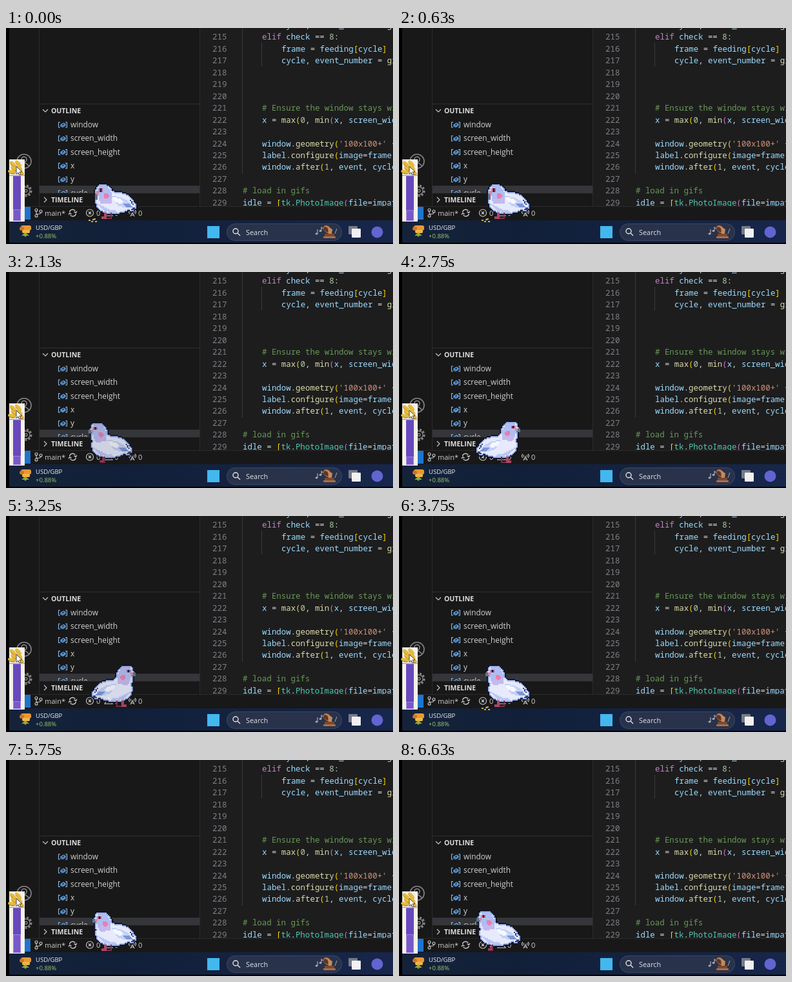
Write an HTML page with a canvas that moves like this. It is 600x337 px and loops after 6.76 s.

```html
<!DOCTYPE html>
<html>
<head>
<meta charset="utf-8">
<style>
html, body { margin: 0; height: 100%; overflow: hidden; background: #000; }
canvas { display: block; width: 100vw; height: 100vh; }
</style>
</head>
<body>
<canvas id="stage" width="600" height="337"></canvas>
<script>
const g = document.getElementById('stage').getContext('2d');
const LOOP = 6760, STEP = 125, LAST = 53, CELL = 2;
const SANS = '"Open Sans", "Noto Sans", sans-serif';
const MONO = '12.42px "Noto Sans Mono", monospace';

function rect(color, x, y, w, h, r = 0) {
  g.fillStyle = color;
  g.beginPath();
  g.roundRect(x, y, w, h, r);
  g.fill();
}
function ellipse(color, x, y, rx, ry = rx, turn = 0) {
  g.fillStyle = color;
  g.beginPath();
  g.ellipse(x, y, rx, ry, turn, 0, 7);
  g.fill();
}
function stroke(color, path, width = 1.1) {
  g.strokeStyle = color;
  g.lineWidth = width;
  g.stroke(new Path2D(path));
}
function shape(color, path) {
  g.fillStyle = color;
  g.fill(new Path2D(path));
}
function text(s, x, y, size, color = '#d0d0d0', weight = 400) {
  g.font = `${weight} ${size}px ${SANS}`;
  g.fillStyle = color;
  g.fillText(s, x, y);
}

// Code: each token starts with the key of its colour.
const SYNTAX = { p: '#c586c0', b: '#9cdcfe', w: '#d4d4d4', n: '#b5cea8', f: '#dcdcaa',
  c: '#6a9955', s: '#ce9178', t: '#4ec9b0', y: '#ffd700', m: '#da70d6' };
const CODE = {
  214: [427, 'bcycle|w, |bevent_number|w = |fgif'],
  215: [397, 'pelif |bcheck |w== |n8|w:'],
  216: [427, 'bframe |w= |bfeeding|y[|bcycle|y]'],
  217: [427, 'bcycle|w, |bevent_number |w= |fgif'],
  221: [397, 'c# Ensure the window stays wi'],
  222: [397, 'bx |w= |fmax|y(|n0|w, |fmin|m(|bx|w, |bscreen_wid'],
  224: [397, "bwindow|w.|fgeometry|y(|s'100x100+' |w+"],
  225: [397, 'blabel|w.|fconfigure|y(|bimage|w=|bframe|y)'],
  226: [397, 'bwindow|w.|fafter|y(|n1|w, |bevent|w, |bcycle'],
  228: [367, 'c# load in gifs'],
  229: [367, 'bidle |w= |y[|ttk|w.|tPhotoImage|m(|bfile|w=|bimpath']
};

function editor() {
  rect('#1d1d1e', 300, 0, 300, 278);
  rect('#3a3a3a', 366, 0, 1, 227);
  rect('#3a3a3a', 396, 23, 1, 37);
  g.font = MONO;
  for (let n = 214; n < 230; n++) {
    const y = 18.2 + (n - 215) * 18.48;
    g.fillStyle = '#7d8085';
    g.fillText(n, 320, y);
    if (!CODE[n]) continue;
    let [x, line] = CODE[n];
    for (const token of line.split('|')) {
      const s = token.slice(1);
      g.fillStyle = SYNTAX[token[0]];
      g.fillText(s, x, y);
      x += g.measureText(s).width;
    }
  }
}

function sidebar() {
  rect('#181818', 5, 0, 295, 278);
  rect('#2b2b2b', 51, 0, 1, 278);
  rect('#2b2b2b', 300, 0, 1, 278);
  rect('#2f2f30', 52, 118, 248, 1);
  rect('#35363a', 52, 246, 248, 11);
  stroke('#ccc', 'M57 127l4 4 4-4');
  text('OUTLINE', 70, 133, 10.5, '#ddd', 700);
  g.save();
  g.beginPath();
  g.rect(52, 119, 248, 138);
  g.clip();
  ['window', 'screen_width', 'screen_height', 'x', 'y', 'cycle'].forEach((name, i) => {
    const y = 151 + i * 21.3;
    stroke('#93b4e0', `M84 ${y - 4}h-2.500v8h2.500M92 ${y - 4}h2.500v8h-2.500`);
    stroke('#5ba6f0', `M85 ${y}l4-2.500 3 1.500v2l-4 2.500-3-1.500zl3 1.500 4-2.500`, 1.3);
    text(name, 100, y + 4, 11.9);
  });
  g.restore();
  rect('#181818', 52, 258, 248, 20);
  rect('#333', 52, 257, 248, 1);
  stroke('#ccc', 'M59 264l4 4-4 4');
  text('TIMELINE', 70, 272, 10.5, '#ddd', 700);

  const icon = '#868686';
  stroke(icon, 'M39 208a11 11 0 1 1-22 0a11 11 0 1 1 22 0M32 205a4 4 0 1 1-8 0a4 4 0 1 1 8 0M20 216q8-11 16 0', 1.6);
  g.setLineDash([3, 2.5]);
  stroke(icon, 'M39 254a8 8 0 1 1-16 0a8 8 0 1 1 16 0', 3);
  g.setLineDash([]);
  stroke(icon, 'M37 254a6 6 0 1 1-12 0a6 6 0 1 1 12 0M33 254a2 2 0 1 1-4 0a2 2 0 1 1 4 0', 1.3);
}

function statusBar() {
  rect('#181818', 5, 278, 595, 22);
  rect('#2b2b2b', 5, 278, 595, 1);
  rect('#1f74cc', 25, 279, 13, 20);
  const c = '#ccc';
  stroke(c, 'M49 284a2 2 0 1 1-4 0a2 2 0 1 1 4 0M49 293a2 2 0 1 1-4 0a2 2 0 1 1 4 0M56 286a2 2 0 1 1-4 0a2 2 0 1 1 4 0M47 286v5M54 288q0 3-7 2');
  text('main*', 60, 292.5, 11);
  stroke(c, 'M98.500 287a5 5 0 0 1 9-1.500M108.500 290a5 5 0 0 1-9 1.500M110 286l-2 2.500-2.500-2M97 291l2-2.500 2.500 2', 1.3);
  stroke(c, 'M135.500 288.500a5.500 5.500 0 1 1-11 0a5.500 5.500 0 1 1 11 0M128 286.500l4 4m0-4l-4 4');
  text('0', 140, 292.5, 11);
  stroke(c, 'M159 283l6 10h-12zM159 287v3m0 1v1');
  text('0', 168, 292.5, 11);
  stroke(c, 'M196 288l-3 6M196 288l3 6M194 292h4M192 290q-3-3 0-6M200 290q3-3 0-6M193.500 288.500q-1-1.500 0-3M198.500 288.500q1-1.500 0-3M195.500 287h1');
  text('0', 205, 292.5, 11);
}

function taskbar() {
  const bg = g.createLinearGradient(0, 0, 600, 0);
  bg.addColorStop(0, '#15233a');
  bg.addColorStop(.3, '#111f38');
  bg.addColorStop(1, '#17264b');
  rect(bg, 5, 300, 595, 35);
  rect('#e8992f', 23, 308, 16, 8, 3);
  rect('#c9762a', 21, 310, 7, 6, 3);
  rect('#f2b548', 25, 315, 12, 5, 2);
  shape('#8fae3c', 'M30 319l6 5h-4l-2 2-2-2h-4z');
  text('USD/GBP', 46, 314.5, 9.5, '#f2f2f2');
  text('+0.88%', 46, 327.5, 9.5, '#9cc96b');
  rect('#43b8ef', 312, 309, 19, 19);

  rect('#3d475f', 342, 305, 179, 27, 13.5);
  rect('#28324a', 343, 306, 177, 25, 12.5);
  stroke('#e4e6ea', 'M360 317a4 4 0 1 1-8 0a4 4 0 1 1 8 0M359 320l4 4', 1.4);
  text('Search', 372, 323, 10.9, '#dfe2e8');
  const note = '#a9a9b6';
  stroke(note, 'M483 321v-7M489 316v-5l3 2', 1.2);
  ellipse(note, 481.5, 321, 2, 1.5);
  ellipse(note, 487.5, 316.5, 2, 1.5);
  ellipse('#b77a4c', 498, 314, 7, 5, .8);
  ellipse('#5e3428', 496.5, 314.5, 5, 3, .8);
  shape('#c48a58', 'M499 310l7 4-1 7-5 1z');
  rect('#7a4934', 494, 321, 15, 6, 1);
  rect('#a7704c', 492, 325, 19, 3, 1);
  stroke('#8f939c', 'M510 321l3-8', 1.2);
  rect('#777b84', 531, 309, 14, 13, 1);
  rect('#f1f1f2', 536, 313, 14, 14, 1);
  ellipse('#6264d0', 575.5, 318.5, 9);
}

function feeder(step) {
  rect('#f3f1ea', 5, 205, 24, 97);
  for (const [x, y, turn] of [[11, 212, .7], [19, 211, .8], [13, 219, .6], [21, 218, .9], [9, 224, .2], [22, 225, .3]]) {
    ellipse('#b98b20', x, y + 1, 6, 2.8, turn);
    ellipse('#e7bb3d', x, y, 6, 2.4, turn);
  }
  rect('#8d8778', 5, 229.5, 24, 1);
  rect('#6849bd', 11, 231, 12, 70);
  const level = step < 31 ? 283 + step * .23 : 272;
  rect('#a184dc', 11, level, 12, 301 - level);
  rect('#7859c8', 12, level + 1, 10, 299 - level);
  const arrow = 'M16 216v12l3-2.500 2 4 2-1-2-4h4z';
  shape('#fff', arrow);
  stroke('#222', arrow, .8);
}

// Bird: polygons sampled on a coarse grid, facing left.
const OUTLINE = '#10142a', SHADE = '#9db2ec', LIGHT = '#e6eafc';
function drawBird({ x, flip, head: [hx, hy], down, tucked, stride = 0, crumbs }) {
  const cells = new Map();
  const key = (c, r) => c + r * 64;
  const sides = [1, -1, 64, -64];
  function poly(color, points, dx = 0, dy = 0) {
    const path = new Path2D('M' + points + 'z');
    for (let r = 0; r < 34; r++) for (let c = 0; c < 36; c++) {
      if (g.isPointInPath(path, c * CELL + 1 - dx, r * CELL + 1 - dy)) cells.set(key(c, r), color);
    }
  }
  const onHead = (color, points) => poly(color, points, hx, hy);

  poly(LIGHT, '28 20 40 22 50 24 58 28 64 36 68 42 68 47 62 52 56 50 48 54 42 55 22 55 12 51 6 44 4 34 8 26');
  onHead(LIGHT, '8 4 20 4 26 8 30 16 32 28 22 34 6 34 4 24 2 16 4 8');
  const edge = [...cells.keys()].filter(k => sides.some(d => !cells.has(k + d)));
  for (const k of edge) {
    cells.set(k, SHADE);
    for (const d of sides) if (!cells.has(k + d)) cells.set(k + d, OUTLINE);
  }
  poly('#bcc6f4', '8 40 16 44 28 50 44 52 30 54 18 52');
  poly('#c3d0f7', '30 28 44 30 56 36 62 46 50 46 38 42');
  poly('#f6f8ff', '32 30 42 32 50 38 42 40 34 36');
  poly('#7b95d8', '48 40 56 40 62 46 52 46');
  poly('#35437f', '58 34 60 34 64 42 62 42');
  poly('#35437f', '60 48 66 46 66 50 60 50');
  if (tucked) {
    onHead('#c9c6f3', '8 12 24 8 28 18 12 24');
    onHead('#e2a3cc', '14 10 18 10 18 14 14 14');
    onHead('#e2a3cc', '22 14 26 14 26 18 22 18');
  } else {
    onHead('#afbdf2', '8 6 20 6 24 10 28 18 28 24 22 28 8 28 6 14');
    onHead('#c3b9ef', '8 26 28 24 28 32 12 34');
    onHead('#e87fae', '16 18 22 18 24 22 20 26 16 24');
    onHead('#c8566c', '8 10 14 10 14 14 8 14');
    onHead('#141a33', '10 10 12 10 12 14 10 14');
    onHead('#5f7390', down ? '2 18 6 18 6 26 2 26' : '0 14 6 14 6 20 0 20');
    onHead('#d58a9c', '4 14 8 14 8 18 4 18');
  }

  const step = stride * 4;
  poly('#b04562', `${18 + step} 54 ${22 + step} 54 ${22 + step} 64 ${14 + step} 64 ${14 + step} 60 ${18 + step} 60`);
  poly('#7c2c48', `${28 - step} 54 ${30 - step} 54 ${30 - step} 64 ${22 - step} 64 ${22 - step} 62 ${28 - step} 62`);

  for (const [k, color] of cells) {
    // Columns left of the grid wrap round to the previous row.
    const r = (k + 8) >> 6, c = k - r * 64;
    rect(color, x + (flip ? 34 - c : c) * CELL, 234 + r * CELL, CELL, CELL);
  }
  if (crumbs) {
    for (const [cx, cy] of [[128, 299], [132, 301], [136, 297], [138, 301], [134, 298]]) {
      rect('#d5ac35', cx, cy, 3, 2);
    }
  }
}

const PECK = [
  { head: [0, -4] },
  { head: [2, 7], down: true },
  { head: [2, 16], tucked: true },
  { head: [2, 16], tucked: true },
  { head: [2, 7], down: true }
];
function bird(step) {
  const feed = n => ({ x: 134, crumbs: true, ...PECK[n % 5] });
  const walk = (x, flip) => ({ x, flip, head: [0, flip ? -4 : -2], stride: step % 2 });
  if (step < 8) return feed(step + 1);
  if (step < 16) return { x: 134, head: [0, 0] };
  if (step < 21) return walk(134 - (step - 15) * 3.2);
  if (step < 28) return walk(118 + Math.max(0, step - 22) * 3.2, true);
  if (step < 41) return feed(step - 25);
  if (step < 49) return { x: 134, head: [0, 0] };
  return walk(134 - (step - 48) * 2.8);
}

function draw(step) {
  rect('#000', 0, 0, 600, 337);
  editor();
  sidebar();
  statusBar();
  taskbar();
  feeder(step);
  drawBird(bird(step));
}

let shown = -1;
function tick() {
  const step = Math.min(LAST, Math.floor(performance.now() % LOOP / STEP));
  if (step !== shown) draw(shown = step);
  requestAnimationFrame(tick);
}
tick();
</script>
</body>
</html>
```
